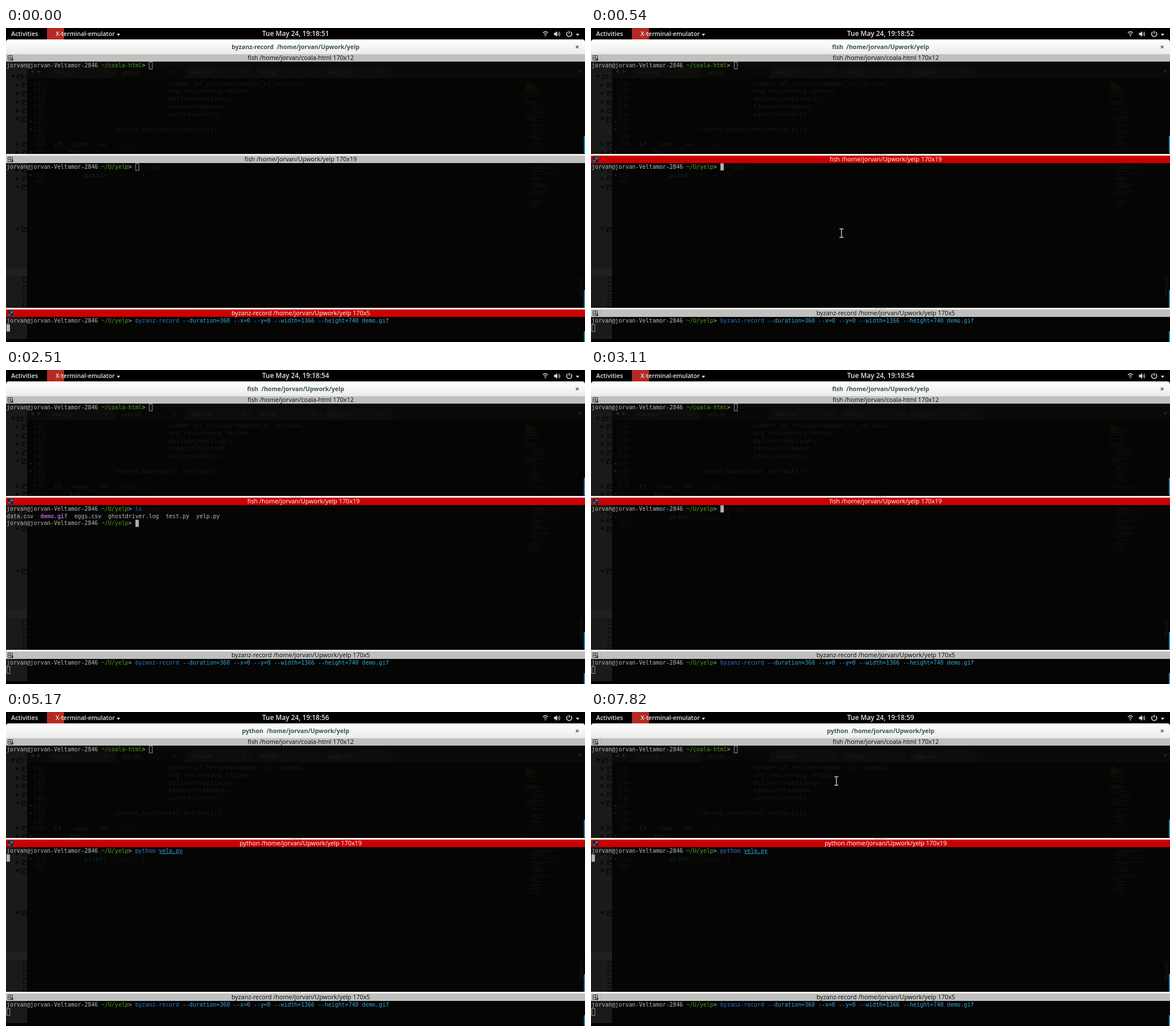
An HTML page that plays this animation: 1017 px wide and 551 px high, repeating every 8000 ms.

```html
<!DOCTYPE html>
<html lang="en">
<head>
<meta charset="utf-8">
<title>Terminal session</title>
<style>
html, body { margin: 0; width: 100%; height: 100%; overflow: hidden; background: #000; }
svg { display: block; width: 100vw; height: 100vh; }
text { white-space: pre; }
.term { font: 9.893px "DejaVu Sans Mono", monospace; }
.code { font: 11.12px "DejaVu Sans Mono", monospace; }
.tab { font: 9px "DejaVu Sans", sans-serif; }
.bar { font: 600 11px "Open Sans", sans-serif; fill: #e6e6e6; }
.pane { font: 10.8px "Open Sans", sans-serif; text-anchor: middle; }
.window { font: 700 10.6px "Open Sans", sans-serif; text-anchor: middle; fill: #3a5555; }
</style>
</head>
<body>
<svg viewBox="0 0 1017 551" preserveAspectRatio="none">
  <g id="backdrop"></g>
  <g id="live"></g>
</svg>
<script>
const LOOP = 8000, CELL = 5.956, ROW = 12.66;
const USER = 'jorvan', HOST = USER + '-Veltamor-2846', HOME = '/home/' + USER;
const INK = '#b4b8b2', GREEN = '#4b9a1c', BLUE = '#2d72c6', CYAN = '#32a3da', RED = '#ee2b2b', HINT = '#626460';
const PANE_TOP = [59.3, 237.4, 507.3];

const escapeText = s => s.replace(/&/g, '&amp;').replace(/</g, '&lt;').replace(/>/g, '&gt;');
const rect = (x, y, w, h, fill, more = '') =>
  `<rect x="${x}" y="${y}" width="${w}" height="${h}" fill="${fill}" ${more}/>`;
const path = (d, fill, more = '') => `<path d="${d}" fill="${fill}" ${more}/>`;
const line = (d, stroke, width = 1, more = '') =>
  path(d, 'none', `stroke="${stroke}" stroke-width="${width}" ${more}`);
const text = (cls, x, y, s, more = '') =>
  `<text class="${cls}" x="${x}" y="${y}" ${more}>${escapeText(s)}</text>`;
const repeat = (n, draw) => Array.from({ length: n }, (_, i) => draw(i)).join('');

// Terminal row made of [text, colour, extra attributes] runs.
const row = (pane, r, runs) =>
  `<text class="term" x="1" y="${PANE_TOP[pane] + r * ROW + 9.7}">` +
  runs.map(([s, fill, more = '']) => `<tspan fill="${fill}" ${more}>${escapeText(s)}</tspan>`).join('') + '</text>';
const prompt = dir => [[USER + '@' + HOST + ' ', INK], [dir, GREEN], ['> ', INK]];
const cursor = (pane, r, col, solid, fill = '#b0b0b0') => {
  const x = 1 + col * CELL, y = PANE_TOP[pane] + r * ROW;
  return solid ? rect(x, y, CELL, 12.6, fill)
    : rect(x + .5, y + .5, CELL - .6, 12.1, 'none', 'stroke="#b8b8b8" stroke-width=".8"');
};
const PROMPT_COLS = HOST.length + USER.length + 12;

function random(seed) {
  return () => (seed = (seed * 16807) % 2147483647) / 2147483647;
}

function folder(x, y) {
  return line(`M${x} ${y + 4}v-8h4l1 1.5h4v2M${x} ${y + 4}l2.5-5h8l-2 5z`, '#050505', 1.1);
}

function sidebar() {
  let out = rect(0, 59, 37, 487, '#1a1a19') + rect(0, 421, 37, 14, '#20201e');
  out += path('M8 82h8l-4 6z', '#080808') + folder(20, 85) + text('tab', 33, 88, 'U', 'fill="#080808"');
  for (const y of [100, 115, 130, 145, 204, 218, 249, 264])
    out += path(`M17 ${y - 4}l6 4l-6 4z`, '#0b0b0b') + folder(29, y);
  for (const y of [160, 279, 353]) out += path(`M16 ${y - 3}h8l-4 6z`, '#0b0b0b') + folder(28, y);
  for (const y of [442, 457, 472, 486]) out += line(`M30 ${y - 4.5}h5l2 2v7h-7z`, '#060606', 1.1);
  return out + rect(37, 59, 4, 432, '#050504');
}

function tabs() {
  let out = rect(37, 59, 980, 29, '#0a0a09');
  out += path('M49 73v7l-6-3.5zM55 73v7l6-3.5zM1005 74h7l-3.5 5z', '#222');
  ['store.py', 'yelp.py', 'data.csv', 'test.py', 'eggs.csv'].forEach((name, i) => {
    const x = 66 + i * 121.4;
    out += path(`M${x} 88q5-1 7-9l2-7q1-4 6-4h102q5 0 7 5l4 9q2 5 6 6z`, i === 1 ? '#070706' : '#0d0d0c');
    out += text('tab', x + 16, 81, name, 'fill="#1e1e1d"');
    out += line(`M${x + 106.5} 75l5 5m0-5l-5 5`, '#1c1c1b');
  });
  return out;
}

function editor() {
  const dim = '#191918', faint = '#0f0f0e', blue = '#0a1a2c';
  const lines = [
    [142, 30, 'number_of_reviews', '=number_of_reviews,'], [143, 30, 'avg_review', '=avg_review,'],
    [144, 30, 'delivery', '=delivery,'], [145, 30, 'takeout', '=takeout,'], [146, 30, 'caters', '=caters)'],
    [147], [148, 16, '', 'record.save(hotel.extract())'], [149],
    [150, 0, 'if', ' __name__ == "__main__":', 1], [151, 4, 'try', ':', 1], [152],
    [153, 4, 'except', ' KeyboardInterrupt:', 1], [154, 8, 'print', '("Closed.")', 1], [155]
  ];
  return lines.map(([n, indent, head, tail, keyword], i) => {
    const y = 101 + i * 13.4;
    let out = text('code', 48, y, String(n), 'fill="#131312"');
    if (n === 147 || n === 148 || n === 151 || n === 154) out += rect(42, y - 5, 2.5, 2.5, '#282828');
    if (!head && !tail) return out;
    const style = keyword ? `fill="${blue}" font-weight="700"` : 'font-style="italic"';
    const rest = escapeText(tail).replace(/".*"/, s => `<tspan fill="${faint}">${s}</tspan>`);
    return out + `<text class="code" x="${84 + indent * 6.694}" y="${y}" fill="${dim}">` +
      `<tspan ${style}>${head}</tspan>${rest}</text>`;
  }).join('');
}

function minimap() {
  const next = random(77);
  let out = rect(911, 88, 1, 403, '#080807') + rect(1008, 438, 5, 32, '#0d0d0c');
  for (let y = 94; y < 320; y += 1.9) {
    const indent = y < 112 ? 0 : Math.floor(next() * 4) * 5;
    const wide = y > 240 && y < 265 ? 55 : 22;
    const width = 5 + next() * wide;
    if (next() > .25 && (y < 208 || y > 237))
      out += rect(913 + indent, y.toFixed(1), width.toFixed(1), 1, y < 112 ? '#0a1c0a' : '#10100f');
  }
  return out;
}

function topBar() {
  let out = rect(0, 0, 1017, 20, '#000') + rect(72, 0, 30, 20, '#b52a22');
  out += text('bar', 9, 14.2, 'Activities', 'style="font-size:10.8px"');
  out += text('bar', 87, 14.2, 'X-terminal-emulator', 'style="font-size:10.55px"');
  out += path('M194.500 10h6l-3 4zM1001 10h6l-3 4z', '#ddd');
  out += line('M943 8.500q4.500-4 9 0M945 11q2.500-2.300 5 0', '#ddd', 1.3) + rect(946.5, 12.5, 2, 2, '#ddd');
  out += path('M962.500 8.500h2.500l3-3v10l-3-3h-2.500z', '#ddd') +
    line('M969.500 8q1.500 2.300 0 5M971.500 6.500q2.500 4 0 8', '#ddd', 1.1);
  out += line('M986.500 6.800a4.600 4.600 0 1 0 5.500 0M989.250 5v5', '#ddd', 1.5);
  return out;
}

function frameParts() {
  let out = path('M0 46V25q0-5 5-5h1007q5 0 5 5v21z', 'url(#shine)');
  out += line('M1001 31l4.500 4.500m0-4.500l-4.500 4.500', '#286b91', 1.6);
  for (const y of [221, 491]) {
    out += rect(0, y, 1017, 3, '#f0f0ef');
    out += repeat(5, i => rect(500 + i * 4, y + .8, 1.5, 1.3, '#9b9b9b'));
  }
  [[189, 31], [460, 31], [532, 19]].forEach(([y, h]) => { out += rect(1015, y, 2, h, '#2f86b5'); });
  return out;
}

function drawBackdrop() {
  const shine = '<defs><linearGradient id="shine" x2="0" y2="1">' +
    '<stop stop-color="#fff"/><stop offset="1" stop-color="#ebebea"/></linearGradient></defs>';
  const command = [['byzanz-record', BLUE], [' --duration=360 --x=0 --y=0 --width=1366 --height=740 demo.gif', CYAN]];
  return shine + rect(0, 0, 1017, 551, '#000') + rect(37, 59, 980, 487, '#050504') +
    sidebar() + tabs() + editor() + minimap() + topBar() + frameParts() +
    row(0, 0, prompt('~/coala-html')) + cursor(0, 0, PROMPT_COLS + 4, false) +
    row(2, 0, [...prompt('~/U/yelp'), ...command]);
}

function paneTitle(y, label, focused, shift = 0) {
  const icon = focused
    ? rect(3, y + 2, 10, 9.5, '#24262a') + rect(8, y + 3, 4, 3.5, '#2f7cb8') + rect(4, y + 7.5, 3.5, 3, '#2f7cb8')
    : line(`M3.500 ${y + 2.5}h8v8h-8zM7.500 ${y + 2.5}v8M3.500 ${y + 6.5}h8`, '#333') +
      path(`M8.500 ${y + 8.5}h5l-2.500 3.500z`, '#222');
  return rect(0, y, 1017, 13, focused ? '#cb0000' : '#c0c0bf') +
    (focused ? '' : rect(17, y, .7, 13, '#adadac')) + icon +
    text('pane', 517.7 + shift, y + 10.3, label, `fill="${focused ? '#fff' : '#080808'}"`);
}

const COMMANDS = ['ls', 'python yelp.py', 'clear'];
const TYPING = [
  [0, ''], [960, 'l'], [1040, 'ls'], [1320, ''], [1790, 'p'], [2290, 'py'], [2470, 'p'], [2510, ''],
  [2750, 'c'], [2810, 'cl'], [2870, 'cle'], [2930, 'clea'], [3070, 'clear'], [3110, ''],
  [3440, 'p'], [3790, 'py'], [3880, 'pyt'], [3980, 'pyth'], [4220, 'pytho'],
  [4480, 'python'], [4610, 'python '], [4900, 'python yelp.py']
];
const TICKS = [130, 1250, 2330, 3250, 4260, 5210, 6190, 7170];
const between = (t, a, b) => t >= a && t < b;

function commandRuns(typed) {
  const [name, ...args] = typed.split(' ');
  const known = ['ls', 'clear', 'python'].includes(name);
  const runs = [[name, known ? BLUE : RED, known ? '' : 'font-weight="700"']];
  if (args.length) runs.push([' ', INK], [args[0], CYAN, 'text-decoration="underline"']);
  return runs;
}

function shell(t) {
  const typed = TYPING.filter(([at]) => at <= t).pop()[1];
  const hint = typed ? (COMMANDS.find(c => c.startsWith(typed)) || typed).slice(typed.length) : '';
  const start = prompt('~/U/yelp');
  const listed = between(t, 1250, 3110);
  const r = between(t, 1320, 3110) ? 2 : 0;
  let out = '';
  if (listed) {
    out += row(1, 0, [...start, ['ls', BLUE]]) + row(1, 1, [['data.csv  ', INK],
      ['demo.gif', '#a95fc4', 'font-weight="700"'], ['  eggs.csv  ghostdriver.log  test.py  yelp.py', INK]]);
  }
  if (between(t, 1180, 1320)) {
    if (!listed) out += row(1, 0, [...start, ...commandRuns(typed)]);
    return out + cursor(1, listed ? 2 : 1, 0, true);
  }
  if (t >= 5170) {
    const lit = !between(t, 5740, 6350) && !between(t, 6940, 7540);
    return out + row(1, 0, [...start, ...commandRuns(typed)]) + (lit ? cursor(1, 1, 0, true) : '');
  }
  out += cursor(1, r, PROMPT_COLS + typed.length, t >= 540, hint ? '#5f5f5f' : '#b0b0b0');
  return out + row(1, r, [...start, ...commandRuns(typed), [hint.slice(0, 1), '#b5b5b5'], [hint.slice(1), HINT]]);
}

function pointer(t) {
  const glide = (from, span, x0, y0, x1, y1) => {
    const k = Math.min(1, Math.floor((t - from) / 40) * 40 / span);
    const e = k * k * (3 - 2 * k);
    return [x0 + (x1 - x0) * e, y0 + (y1 - y0) * e];
  };
  let at;
  if (between(t, 50, 960)) at = glide(50, 280, 428, 543, 440, 360);
  else if (t >= 7420) at = glide(7420, 400, 440, 355, 431, 121);
  else return '';
  const beam = 'M-3.500-7.500h2.500l1 1l1-1h2.500M0-6.500v13M-3.500 7.500h2.500l1-1l1 1h2.500';
  return `<g transform="translate(${at[0].toFixed(1)} ${at[1].toFixed(1)})">` +
    line(beam, '#111', 3) + line(beam, '#c4c4c4', 1.4) + '</g>';
}

function drawLive(t) {
  const job = t < 5170 ? 'fish' : 'python';
  const place = HOME + '/Upwork/yelp';
  const seconds = 51 + TICKS.filter(at => at <= t).length;
  const recording = t < 540;
  const recorderCursor = between(t, 210, 540) ? '' : cursor(2, 1, 0, recording);
  return text('bar', 450, 14.2, 'Tue May 24, 19:18:' + seconds, 'style="font-size:11.85px"') +
    text('window', 508.7, 37.2, (recording ? 'byzanz-record' : job) + '  ' + place) +
    paneTitle(46, `fish ${HOME}/coala-html 170x12`, false) +
    paneTitle(224, `${job} ${place} 170x19`, !recording, between(t, 1320, 3110) ? 5 : 0) +
    paneTitle(494, `byzanz-record ${place} 170x5`, recording) +
    shell(t) + recorderCursor + pointer(t);
}

const live = document.getElementById('live');
document.getElementById('backdrop').innerHTML = drawBackdrop();
let shown = '';
function render(now) {
  const markup = drawLive(now % LOOP);
  if (markup !== shown) live.innerHTML = shown = markup;
}
const origin = performance.now();
function loop() {
  render(performance.now() - origin);
  requestAnimationFrame(loop);
}
loop();
</script>
</body>
</html>
```
